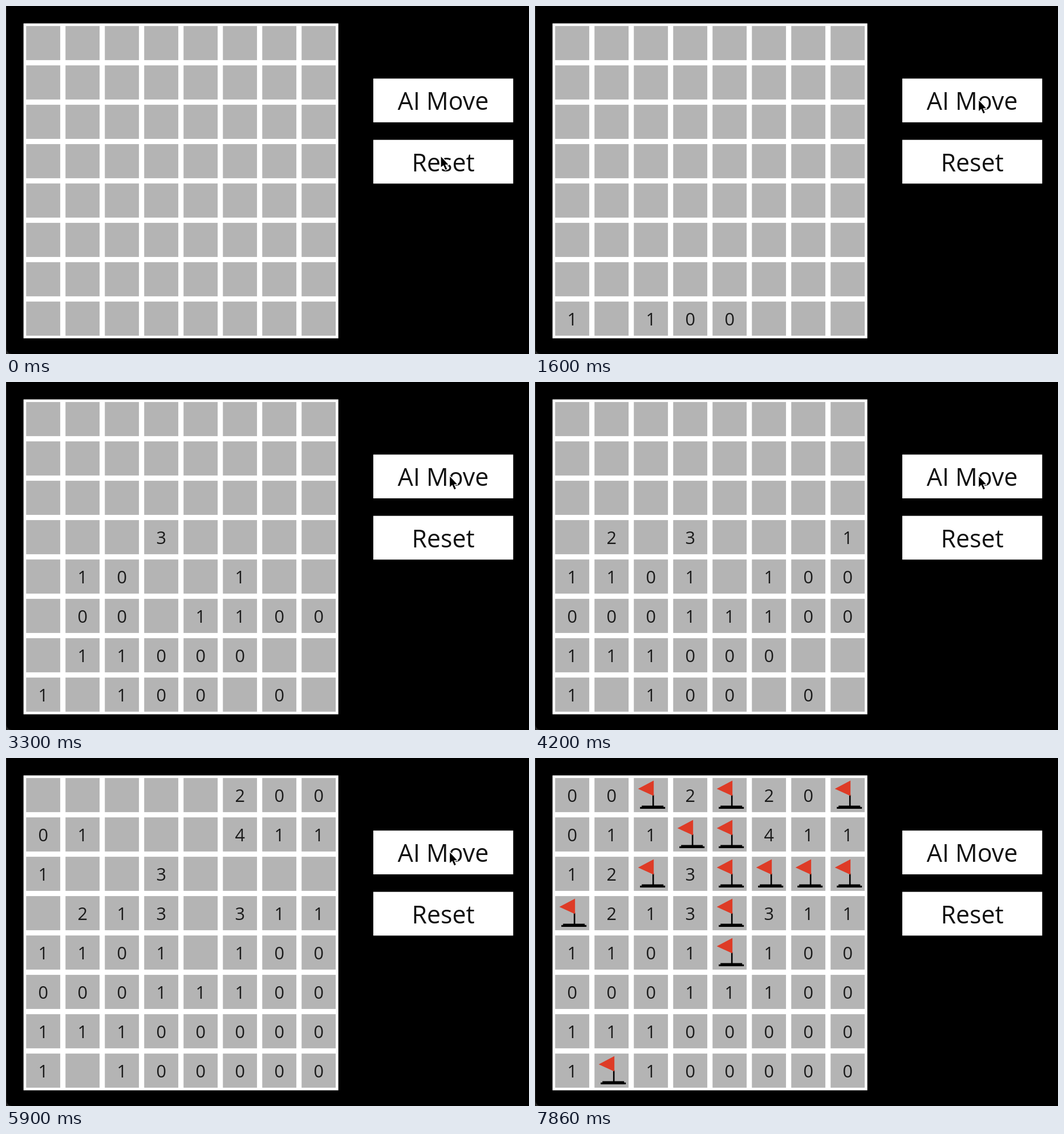
These frames come from a looping animation (917x610 px, 8.02 s). An HTML page:

```html
<!DOCTYPE html>
<html lang="en">
<head>
<meta charset="utf-8">
<title>Mine grid</title>
<style>
  html, body { margin: 0; width: 100%; height: 100%; overflow: hidden; background: #262626; }
  svg { display: block; width: 917px; height: 610px; }
  text { font-family: "Open Sans", "Noto Sans", sans-serif; text-anchor: middle; fill: #111; }
  .digit { font-size: 30.67px; fill: #1a1a1a; }
  .label { font-size: 42.93px; }
  .cell { fill: #b4b4b4; }
</style>
</head>
<body>
<svg id="stage" viewBox="0 0 917 610">
  <defs>
    <g id="flag">
      <path d="M37.2 34H39.8V53H56.5V55.2H59.5V58.4H15.5V55.2H18.5V53H37.2Z"/>
      <path d="M12 23.5L39.5 9V36Z" fill="#de3b26"/>
    </g>
  </defs>
  <path d="M1 0H917V610H11Q1 610 1 599Z"/>
  <rect x="30.7" y="30.5" width="552" height="552" fill="#fff"/>
  <g id="board"></g>
  <g id="buttons"></g>
  <path id="cursor" d="M0 0V18.5L4.3 14.8L7.8 22.8L10.6 21.6L7.2 13.8H12.8Z"
        stroke="#fff" stroke-width="3" stroke-linejoin="round" paint-order="stroke"/>
</svg>
<script>
const LOOP = 8020, STEP = 100, SIZE = 8;
const FIRST_OPEN = 1300, PAUSE = 3000, FLAG_TIME = 6600;
const LEAVE = 7700, POINTER_END = 7860;
const LEFT = 30.7, TOP = 30.5, PITCH = 69, LINE = 4.6;

// Letters a to e: the wave that opens a cell; M: mine; x: wrongly suspected.
// A capital also gets a flag at the end.
const field = ["eeEeMddD", "ddexMddd", "deMdMxMx", "Mcdbxddc",
               "cbbcMbcc", "cbacbbab", "cabaaadd", "aMaaadbd"];

const byId = id => document.getElementById(id);

function add(parent, tag, attrs, text) {
  const el = document.createElementNS("http://www.w3.org/2000/svg", tag);
  for (const key in attrs) el.setAttribute(key, attrs[key]);
  if (text !== undefined) el.textContent = text;
  parent.appendChild(el);
  return el;
}

const cells = field.flatMap((line, row) => [...line].map((mark, col) => ({
  mark, row, col, x: LEFT + col * PITCH, y: TOP + row * PITCH
})));

const isNear = (a, b) => Math.max(Math.abs(a.row - b.row), Math.abs(a.col - b.col)) === 1;
const countMines = cell => cells.filter(c => c.mark === "M" && isNear(c, cell)).length;
const wave = cell => cell.mark.toLowerCase();
const isFlagged = cell => /[A-Zx]/.test(cell.mark);

const board = byId("board");
const items = [];

for (const { x, y } of cells) {
  const side = PITCH - 2 * LINE;
  add(board, "rect", { class: "cell", x: x + LINE, y: y + LINE, width: side, height: side });
}

// Each wave climbs from the bottom row, one cell per step.
const opened = cells.filter(c => /[a-e]/i.test(c.mark)).sort((a, b) =>
  wave(a).localeCompare(wave(b)) || b.row - a.row || a.col - b.col);

opened.forEach((cell, i) => {
  const el = add(board, "text",
    { class: "digit", x: cell.x + PITCH / 2, y: cell.y + PITCH / 2 + 11.9 }, countMines(cell));
  const time = FIRST_OPEN + i * STEP;
  items.push({
    el,
    from: time < PAUSE ? time : time + STEP,
    to: isFlagged(cell) ? FLAG_TIME : LOOP
  });
});

for (const { x, y } of cells.filter(isFlagged)) {
  items.push({ el: add(board, "use", { href: "#flag", x, y }), from: FLAG_TIME, to: LOOP });
}

["AI Move", "Reset"].forEach((label, i) => {
  const y = 127.2 + i * 107.4;
  add(byId("buttons"), "rect", { x: 644, y, width: 245.3, height: 76.7, fill: "#fff" });
  add(byId("buttons"), "text", { class: "label", x: 766.6, y: y + 55.2 }, label);
});

// The pointer sweeps an arc from one button to the other, then settles.
function pointerAt(t) {
  if (t >= LEAVE) return [714, 393];
  if (t >= 800) return [778.2, 165.5];
  const step = Math.max(0, Math.min(5, Math.floor(t / STEP) - 1));
  const angle = (100 + 44 * step) * Math.PI / 180;
  return [770 + 42 * Math.cos(angle), 205 + 60 * Math.sin(angle)];
}

const cursor = byId("cursor");
const show = (el, on) => el.setAttribute("visibility", on ? "visible" : "hidden");

function draw(t) {
  for (const { el, from, to } of items) show(el, t >= from && t < to);
  cursor.setAttribute("transform", `translate(${pointerAt(t)})`);
  show(cursor, t < POINTER_END);
}

const begin = performance.now();
function tick() {
  draw((performance.now() - begin) % LOOP);
  requestAnimationFrame(tick);
}
tick();
</script>
</body>
</html>
```
